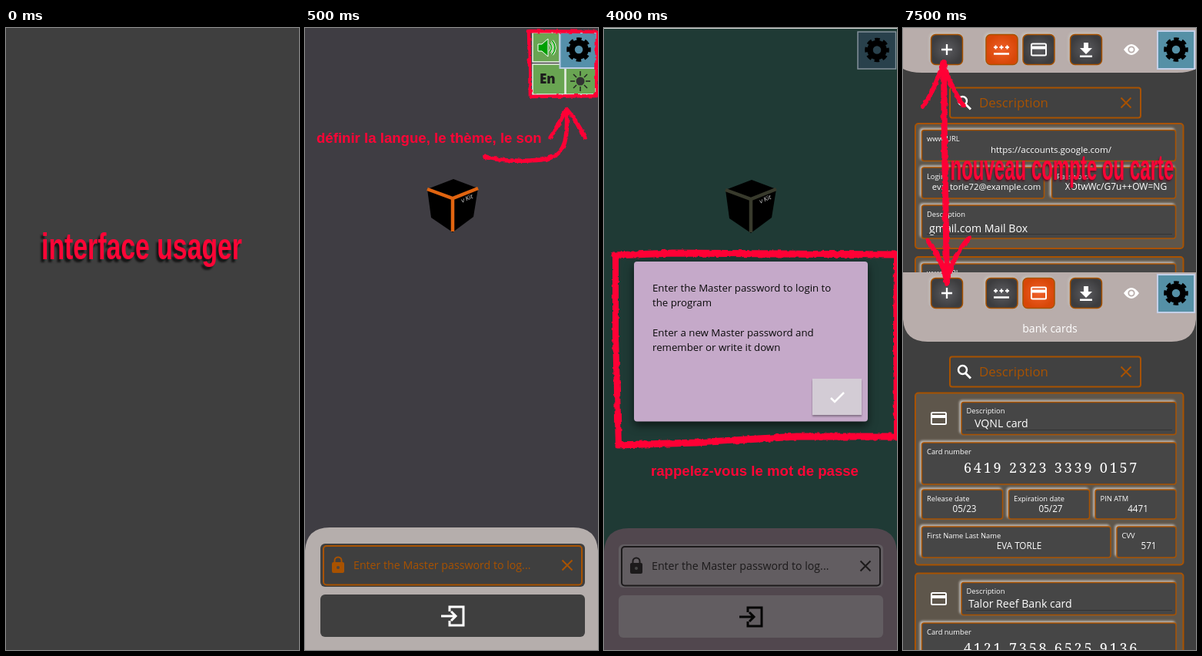
Animation of 381x807 px, one loop 8 s. Source, as an HTML page:

```html
<!DOCTYPE html>
<html lang="fr">
<head>
<meta charset="utf-8">
<title>Interface usager</title>
<style>
html, body { margin: 0; width: 100%; height: 100%; overflow: hidden; background: #3f3f3f; }
svg { display: block; position: absolute; left: 0; top: 0; }
text { font-family: "Open Sans", "Noto Sans", sans-serif; white-space: pre; }
.note { font-family: "Liberation Sans", Arial, sans-serif; font-weight: bold; fill: #ff0536; }
.caption { font-size: 18.62px; }
.embossed { filter: drop-shadow(-3px 4px 1px #161616); }
.engraved { filter: drop-shadow(-1px 2px 1px #5a1020); }
.brush { fill: none; stroke: #ff0536; stroke-linecap: round; stroke-linejoin: round; filter: url(#rough); }
.digits { font-family: "Noto Serif", serif; font-size: 18px; letter-spacing: 2.8px; }
.raised { filter: drop-shadow(-1.5px -1.5px 1.5px #c4beb8); }
.line { fill: none; stroke: currentColor; }
.scene { visibility: hidden; animation: 8s step-end infinite; }
#title { animation-name: title; }
#settings { animation-name: settings; }
#password { animation-name: password; }
#accounts { animation-name: accounts; }
@keyframes title { 0% { visibility: visible } 6.25%, 100% { visibility: hidden } }
@keyframes settings { 0% { visibility: hidden } 6.25% { visibility: visible } 50%, 100% { visibility: hidden } }
@keyframes password { 0% { visibility: hidden } 50% { visibility: visible } 93.75%, 100% { visibility: hidden } }
@keyframes accounts { 0% { visibility: hidden } 93.75%, 100% { visibility: visible } }
</style>
</head>
<body>
<svg width="381" height="807" viewBox="0 0 381 807">
  <defs>
    <filter id="rough" filterUnits="userSpaceOnUse" x="0" y="0" width="381" height="807">
      <feTurbulence type="fractalNoise" baseFrequency=".16" numOctaves="2" seed="4"/>
      <feDisplacementMap in="SourceGraphic" scale="4" xChannelSelector="R" yChannelSelector="G"/>
    </filter>
    <radialGradient id="dark"><stop stop-color="#5c5c60"/><stop offset="1" stop-color="#3c3c3e"/></radialGradient>
    <radialGradient id="hot"><stop stop-color="#f0602a"/><stop offset="1" stop-color="#d84708"/></radialGradient>
    <g id="gear" fill="none" stroke="#000">
      <circle r="9" stroke-width="7.5"/>
      <circle r="13.3" stroke-width="5" stroke-dasharray="6.2 4.246" stroke-dashoffset="3.1"/>
    </g>
    <g id="cube">
      <path d="M193 196L225 208L219 245L192 265L164 246L159 209Z"/>
      <path class="line" stroke-width="4.5" d="M159 209L192 221L225 208M192 221V264"/>
      <text transform="translate(204 227) rotate(-24) skewX(-12)" font-size="8" fill="#ddd">v Kit</text>
    </g>
    <g id="lock">
      <rect x="35" y="693" width="16" height="14" rx="2" fill="currentColor"/>
      <path class="line" stroke-width="2" d="M38.5 694v-3a4.5 4.5 0 0 1 9 0v3"/>
      <circle cx="43" cy="700" r="2" fill="#464646"/>
    </g>
    <path id="login" class="line" stroke-width="3" d="M188 757v-6h18v24h-18v-6M177 763h18M190 757l6 6l-6 6"/>
    <g id="bankcard">
      <rect x="-9.5" y="-7.5" width="19" height="15" rx="1.5" fill="none" stroke="#fff" stroke-width="2"/>
      <path d="M-9 -2.5H9" stroke="#fff" stroke-width="4"/>
    </g>
  </defs>
  <g class="scene" id="title"></g>
  <g class="scene" id="settings"></g>
  <g class="scene" id="password"></g>
  <g class="scene" id="accounts"></g>
</svg>
<script>
const ORANGE = '#a85200';
const rect = (x, y, w, h, fill, more = '') =>
  `<rect x="${x}" y="${y}" width="${w}" height="${h}" fill="${fill}" ${more}/>`;
const text = (x, y, size, str, fill = '#fff', more = '') =>
  `<text x="${x}" y="${y}" font-size="${size}" fill="${fill}" ${more}>${str}</text>`;
const use = (id, x = 0, y = 0, color = '#fff') =>
  `<use href="#${id}" x="${x}" y="${y}" color="${color}"/>`;
const brush = (width, d) => `<path class="brush" stroke-width="${width}" d="${d}"/>`;
const cross = (x, y, r, color) =>
  `<path d="M${x - r} ${y - r}l${2 * r} ${2 * r}m0 ${-2 * r}l${-2 * r} ${2 * r}" stroke="${color}" stroke-width="2"/>`;
const caption = (x, y, str) => `<text class="note caption" x="${x}" y="${y}">${str}</text>`;
const squeezed = (x, y, size, scale, style, str) =>
  `<g class="${style}"><text class="note" font-size="${size}" transform="translate(${x} ${y}) scale(${scale} 1)">${str}</text></g>`;
const fill = (id, ...parts) => document.getElementById(id).innerHTML = parts.join('');

const loginPanel = (dx, dy, panel, box, ink, arrow) => `
  <path d="M0 ${807}V${678 + dy}Q2 ${648 + dy} 32 ${648 + dy}H349Q379 ${648 + dy} 381 ${678 + dy}V807Z" fill="${panel}"/>
  <g transform="translate(${dx} ${dy})">
    ${rect(20, 669, 344, 56, box, 'rx="6"')}
    ${rect(24, 672, 336, 50.5, 'none', `rx="4" stroke="${ink}" stroke-width="2"`)}
    ${use('lock', 0, 0, ink)}
    ${text(63, 702, 14.2, 'Enter the Master password to log...', ink)}
    ${cross(341, 697, 6.5, ink)}
    ${rect(20, 735, 344, 55, box, 'rx="6"')}
    ${use('login', 0, 0, arrow)}
  </g>`;

fill('title',
  rect(0, 0, 381, 807, '#3f3f3f'),
  squeezed(46, 300, 48, .704, 'embossed', 'interface usager'));

const green = (x, y, w, h) => rect(x, y, w, h, '#69a552', 'stroke="#eef3ea" stroke-width="1.5"');
fill('settings',
  rect(0, 0, 381, 807, '#3f3d43'),
  use('cube', 0, 0, '#e06410'),
  loginPanel(0, 0, '#b5aeac', '#3f3f3f', ORANGE, '#fff'),
  text(339, 88, 11, '(. . . s', '#fff', 'font-weight="bold"'),
  green(296, 6, 35, 38), green(296, 47, 42, 39), green(339, 52, 39, 34),
  rect(331.5, 6, 48, 46, '#5590aa', 'stroke="#b9cbe6" stroke-width="2"'),
  use('gear', 356, 28),
  `<path d="M303 21h5l8 -7v23l-8 -7h-5z" fill="#00a000" stroke="#fff"/>
   <path d="M318.500 20q4 5.500 0 11M321.500 16.500q7 9 0 18" fill="none" stroke="#fff" stroke-width="3.400"/>
   <path d="M318.500 20q4 5.500 0 11M321.500 16.500q7 9 0 18" fill="none" stroke="#00a000" stroke-width="1.700"/>`,
  text(305, 72, 17, 'En', '#1c1c1c', 'font-weight="800"'),
  `<circle cx="358" cy="69" r="5.500" fill="#333"/>
   <path d="M358 56v6M358 76v6M345 69h6M365 69h6M349 60l4 4M363 74l4 4M367 60l-4 4M353 74l-4 4" stroke="#222" stroke-width="1.500"/>`,
  brush(4.5, 'M291 4L380 5L379 88L293 89Z'),
  brush(5.5, 'M234 167C255 173 285 173 307 171C335 168 343 152 340 107'),
  brush(5, 'M319 142Q330 126 340 105Q354 121 364 142'),
  caption(15, 149, 'définir la langue, le thème, le son'));

fill('password',
  rect(0, 0, 381, 807, '#1f3a35'),
  rect(0, 0, 381, 1, '#d8dcda'),
  rect(330, 5, 49.5, 48, '#29414c', 'stroke="#84919a" stroke-width="1.5"'),
  use('gear', 355, 28.5),
  use('cube', -1, 1, '#383a2c'),
  loginPanel(-1, 1, '#51474e', '#625d61', '#1c1a1b', '#050505'),
  brush(9, 'M13 295L90 292L230 293L381 294'),
  brush(8, 'M15 295L15 400L19 541'),
  brush(9, 'M18 541L120 538L250 530L379 530'),
  brush(6, 'M380 294L379 400L380 530'),
  rect(39, 303, 304, 207.5, '#c5a9c9', 'rx="4" style="filter:drop-shadow(0 5px 6px #0009)"'),
  ...[[342, 'Enter the Master password to login to'], [361, 'the program'],
    [400, 'Enter a new Master password and'], [419, 'remember or write it down']]
    .map(([y, line]) => text(63, y, 13.25, line, '#0b0b0b')),
  rect(271, 455, 64, 47, '#d3ccd5', 'style="filter:drop-shadow(0 2px 1px #0005)"'),
  '<path d="M295 480l5 5l12 -12" fill="none" stroke="#fff" stroke-width="2.500"/>',
  caption(61, 581, 'rappelez-vous le mot de passe'));

const button = (x, hot) =>
  `<g class="raised">${rect(x, 8.5, 41, 39, `url(#${hot ? 'hot' : 'dark'})`, `rx="6" stroke="${ORANGE}" stroke-width="1.5"`)}</g>`;
const toolbar = (y, cardsActive) => `<g transform="translate(0 ${y})">
  ${button(36.5)}${button(108, !cardsActive)}${button(156, cardsActive)}${button(217.5)}
  <path d="M50 28h14M57 21v14M118 33.500h20" stroke="#fff" stroke-width="2.300"/>
  <path d="M118 25h5m-2.500 -2.500v5M125.500 25h5m-2.500 -2.500v5M133 25h5m-2.500 -2.500v5" stroke="#fff" stroke-width="2"/>
  ${use('bankcard', 176.5, 28)}
  <path d="M235 19h6v7h5l-8 8l-8 -8h5zM230 35.500h16v2.500h-16z" fill="#fff"/>
  <path d="M287 28q10 -14 20 0q-10 14 -20 0z" fill="#fff"/>
  <circle cx="297" cy="28" r="3.700" fill="none" stroke="#b8adab" stroke-width="1.800"/>
  ${rect(331, 4, 48, 49, '#5590a6', 'stroke="#c3d0e8" stroke-width="2"')}
  ${use('gear', 355, 28)}</g>`;
const search = y => rect(61, y, 248, 39, '#414141', `rx="3" stroke="${ORANGE}" stroke-width="2"`) +
  `<circle cx="77.500" cy="${y + 17}" r="5.500" fill="none" stroke="#fff" stroke-width="2.500"/>
   <path d="M81 ${y + 21}l7 7" stroke="#fff" stroke-width="3"/>` +
  text(99, y + 25.5, 16.85, 'Description', ORANGE) + cross(290, y + 19.5, 6.5, ORANGE);
const group = (y, h) => rect(16, y, 348.5, h, '#5e564b', `rx="4" stroke="${ORANGE}" stroke-width="2"`);
const field = (x, y, w, h, label) =>
  `<g class="raised">${rect(x, y, w, h, '#464646', `rx="3" stroke="${ORANGE}" stroke-width="1.5"`)}</g>` +
  text(x + 6.5, y + 14.5, 9.35, label);
const value = (x, y, str, size = 11.7) => text(x, y, size, str, '#fff', 'text-anchor="middle"');
const heading = (x, y, str) => text(x, y, 14.15, str);
const number = (y, str) => `<text class="digits" x="79" y="${y}" fill="#fff">${str}</text>`;
const rule = (x, y) => rect(x, y, 350 - x, 1, '#333');

fill('accounts',
  rect(0, 0, 381, 807, '#3f3f3f'),
  '<path d="M0 0H381V53Q372 58 356 58H25Q9 58 0 53Z" fill="#b8adab"/>',
  toolbar(0, false),
  search(77.5),
  group(124, 162),
  field(24.5, 132.5, 330, 40, 'www/URL'), value(192.5, 162, 'https://accounts.google.com/', 11.55),
  field(24.5, 181, 159, 40, 'Login'), value(108.5, 210, 'eva_torle72@example.com', 11.3),
  field(193.5, 181, 161, 40, 'Password'), value(277, 210, 'XOtwWc/G7u++OW=NG', 12),
  field(24.5, 230, 330, 43, 'Description'), heading(34, 265, 'gmail.com Mail Box'), rule(31, 267),
  group(297, 60), field(24.5, 306, 330, 40, 'www/URL'),
  rect(0, 317, 381, 490, '#3f3f3f'),
  '<path d="M0 317H381V378Q379 407 349 407H32Q2 407 0 378Z" fill="#b8adab"/>',
  toolbar(316, true),
  value(191, 395, 'bank cards', 14.1),
  search(426.5),
  group(473.5, 223), use('bankcard', 46.5, 506.5),
  field(76, 485.5, 279, 42, 'Description'), heading(93, 518, 'VQNL card'), rule(82, 521),
  field(24.5, 538, 330.5, 54, 'Card number'), number(577, '6419 2323 3339 0157'),
  field(24.5, 599, 105, 38, 'Release date'), value(80, 628, '05/23'),
  field(137.5, 599, 105, 38, 'Expiration date'), value(192, 628, '05/27'),
  field(250, 599, 105, 38, 'PIN ATM'), value(305.5, 628, '4471'),
  field(24.5, 647, 245.5, 40, 'First Name Last Name'), value(151, 676, 'EVA TORLE'),
  field(278, 647, 77, 40, 'CVV'), value(319.5, 676, '571'),
  group(707.5, 130), use('bankcard', 46.5, 740.5),
  field(76, 719.5, 279, 42, 'Description'), heading(85, 752, 'Talor Reef Bank card'), rule(82, 755),
  field(24.5, 772, 330.5, 54, 'Card number'), number(811, '4121 7358 6525 9136'),
  brush(8, 'M53 45L54 150L57 328'),
  brush(6, 'M26 102Q43 78 52 44Q63 80 79 101'),
  brush(6, 'M32 276Q51 300 57 331Q64 296 86 272'),
  squeezed(61.5, 197, 46, .522, 'engraved', 'nouveau compte ou carte'));
</script>
</body>
</html>
```
